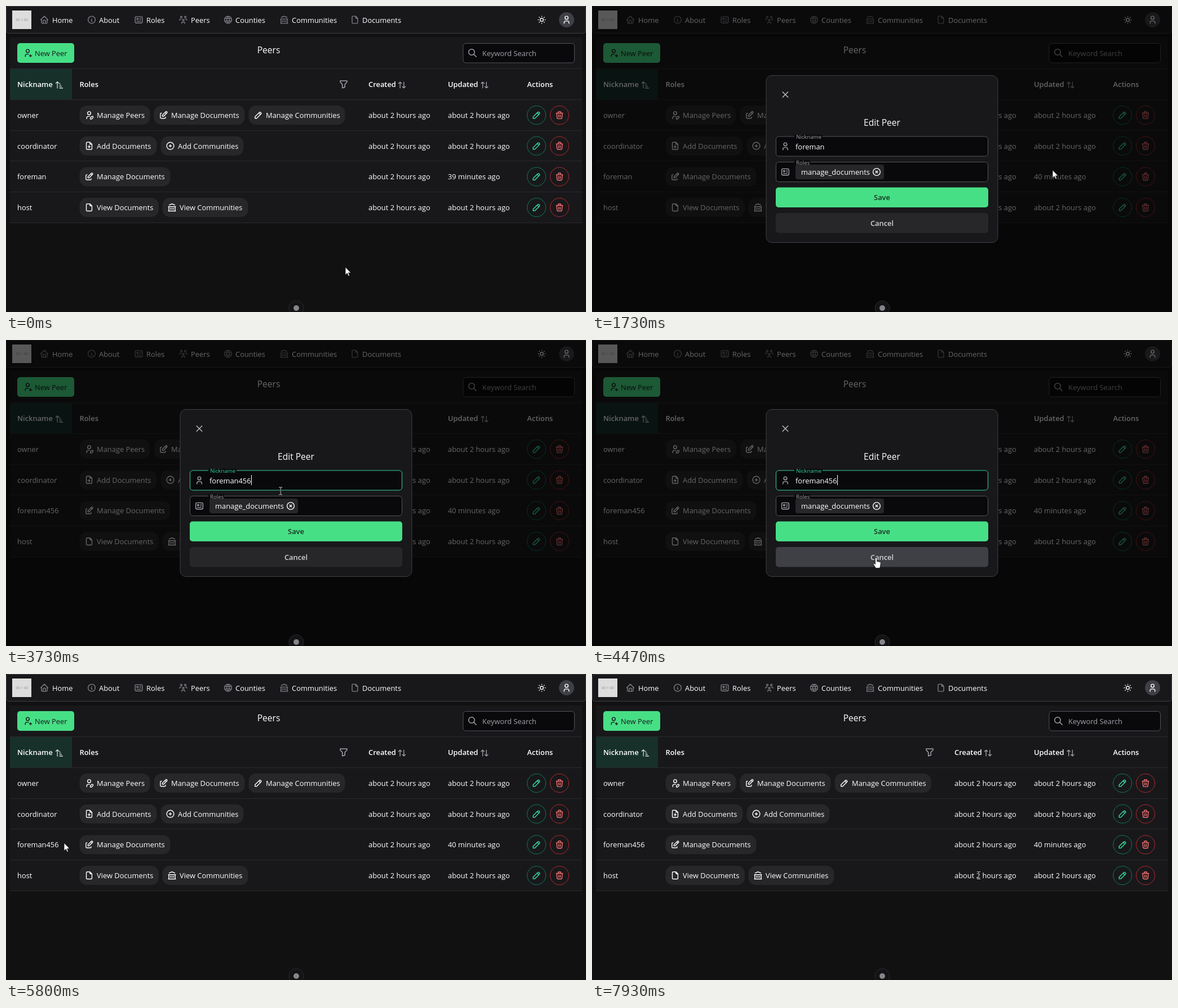
Animation, 1029 px wide and 544 px high, one loop 8 s. Source, as an HTML page:

```html
<!DOCTYPE html>
<html lang="en">
<head>
<meta charset="utf-8">
<title>Accounts table</title>
<style>
html, body { margin: 0; width: 100%; height: 100%; overflow: hidden; background: #111112; }
svg { display: block; width: 1029px; height: 544px; }
text { font: 12.9px "Open Sans", "Noto Sans", sans-serif; fill: #fff; white-space: pre; }
.bold { font-weight: 600; }
.title { font-size: 15.6px; }
.mid { text-anchor: middle; }
.label { font-size: 9.7px; fill: #a1a1aa; }
.icon { fill: none; stroke-width: 2; stroke-linecap: round; stroke-linejoin: round; }
.field { fill: #09090b; stroke: #52525b; }

/* 1% of the loop is 80 ms */
.anim { animation: 8s step-end infinite; }
.smooth { animation-timing-function: linear; }

.pointer { animation-name: path; }
@keyframes path {
  0%, .8% { transform: translate(602px, 464px); }
  3% { transform: translate(680px, 434px); }
  6% { transform: translate(868px, 343px); }
  8.5% { transform: translate(938px, 305px); }
  10%, 16.7% { transform: translate(946px, 300px); }
  18.8% { transform: translate(917px, 297px); }
  21.6% { transform: translate(821px, 292px); }
  23.5% { transform: translate(620px, 268px); }
  25%, 27.7% { transform: translate(525px, 252px); }
  30%, 42% { transform: translate(532px, 416px); }
  42.01%, 43.5% { transform: translate(498px, 252px); }
  46.6% { transform: translate(487px, 267px); }
  48% { transform: translate(492px, 318px); }
  50%, 50.8% { transform: translate(504px, 359px); }
  53.4%, 66% { transform: translate(504px, 387px); }
  69% { transform: translate(330px, 352px); }
  72.5% { transform: translate(103px, 300px); }
  74.5% { transform: translate(95px, 322px); }
  77% { transform: translate(62px, 332px); }
  80% { transform: translate(22px, 322px); }
  82% { transform: translate(8px, 300px); }
  83.4% { transform: translate(23px, 279px); }
  86% { transform: translate(58px, 268px); }
  88.5% { transform: translate(89px, 284px); }
  90.5% { transform: translate(78px, 318px); }
  92.5% { transform: translate(38px, 326px); }
  94.5% { transform: translate(10px, 322px); }
  96.5% { transform: translate(180px, 346px); }
  98.2% { transform: translate(540px, 362px); }
  99.1%, 100% { transform: translate(686px, 358px); }
}
.arrow { animation-name: arrow; }
@keyframes arrow {
  0%, 16.1%, 28.7%, 66.3% { visibility: visible; }
  8%, 24.5%, 37.5%, 98.6%, 100% { visibility: hidden; }
}
.hand { animation-name: hand; }
@keyframes hand {
  0%, 16.1%, 66.3%, 100% { visibility: hidden; }
  8%, 48.1% { visibility: visible; }
}
.beam { animation-name: beam; }
@keyframes beam {
  0%, 28.7%, 48.1% { visibility: hidden; }
  24.5%, 43.5%, 98.6%, 100% { visibility: visible; }
}

.dialog { transform-origin: 514.5px 272px; animation-name: dialog; }
@keyframes dialog {
  0%, 66%, 100% { opacity: 0; transform: scale(.7); }
  16.75% { opacity: 0; transform: scale(.7); animation-timing-function: cubic-bezier(0, 0, .2, 1); }
  18.625% { opacity: 1; transform: none; }
  64.125% { opacity: 1; transform: none; animation-timing-function: cubic-bezier(0, 0, .2, 1); }
}
.mask { animation-name: mask; }
@keyframes mask {
  0%, 66%, 100% { opacity: 0; }
  16.75% { opacity: 0; animation-timing-function: ease; }
  18.625% { opacity: .6; }
  64.125% { opacity: .6; animation-timing-function: ease; }
}

.tip { animation-name: tip; }
@keyframes tip { 0%, 17.4%, 100% { visibility: hidden; } 8.6% { visibility: visible; } }
.glow { animation-name: glow; }
@keyframes glow { 0%, 17.4%, 100% { visibility: hidden; } 8% { visibility: visible; } }
.before { animation-name: before; }
@keyframes before { 0% { visibility: visible; } 17.5%, 100% { visibility: hidden; } }
.after { animation-name: after; }
@keyframes after { 0% { visibility: hidden; } 17.5%, 100% { visibility: visible; } }

.key1 { animation-name: key1; }
.key2 { animation-name: key2; }
.key3 { animation-name: key3; }
@keyframes key1 { 0% { visibility: hidden; } 37.5%, 100% { visibility: visible; } }
@keyframes key2 { 0% { visibility: hidden; } 40%, 100% { visibility: visible; } }
@keyframes key3 { 0% { visibility: hidden; } 42.6%, 100% { visibility: visible; } }
.caret { animation-name: caret; }
@keyframes caret {
  0%, 34.1%, 100% { visibility: hidden; transform: none; }
  27.9% { visibility: visible; transform: none; }
  37.5% { visibility: visible; transform: translateX(7.4px); }
  40% { visibility: visible; transform: translateX(14.8px); }
  42.6%, 55.8% { visibility: visible; transform: translateX(22px); }
  49.2%, 62.5% { visibility: hidden; transform: translateX(22px); }
}
.ring { animation-name: ring; }
@keyframes ring { 0%, 62.5%, 100% { stroke: #52525b; } 27.9% { stroke: #34d399; } }
.tint { animation-name: tint; }
@keyframes tint { 0%, 62.5%, 100% { fill: #a1a1aa; } 27.9% { fill: #34d399; } }
.save { animation-name: save; }
@keyframes save { 0%, 51.6%, 100% { fill: #47df86; } 48.1% { fill: #86efac; } }
.cancel { animation-name: cancel; }
@keyframes cancel { 0%, 62.5%, 100% { fill: #27272a; } 51.6% { fill: #3f3f46; } }
</style>
</head>
<body>
<svg id="stage" viewBox="0 0 1029 544"></svg>
<script>
const ring = 'M3 12a9 9 0 1 0 18 0a9 9 0 1 0-18 0';
const head = 'M8 7a4 4 0 1 0 8 0a4 4 0 0 0-8 0';
const sheet = 'M14 3v4a1 1 0 0 0 1 1h4M17 21H7a2 2 0 0 1-2-2V5a2 2 0 0 1 2-2h7l5 5v11a2 2 0 0 1-2 2z';
const paths = {
  home: 'M5 12H3l9-9 9 9h-2M5 12v7a2 2 0 0 0 2 2h10a2 2 0 0 0 2-2v-7M9 21v-6a2 2 0 0 1 2-2h2a2 2 0 0 1 2 2v6',
  info: ring + 'M12 8.5h.01M11 12h1v4h1',
  card: 'M3 7a3 3 0 0 1 3-3h12a3 3 0 0 1 3 3v10a3 3 0 0 1-3 3H6a3 3 0 0 1-3-3zM7 10a2 2 0 1 0 4 0a2 2 0 1 0-4 0M15 8h2M15 12h2M7 16h10',
  group: 'M10 13a2 2 0 1 0 4 0a2 2 0 0 0-4 0M8 21v-1a2 2 0 0 1 2-2h4a2 2 0 0 1 2 2v1M15 5a2 2 0 1 0 4 0a2 2 0 0 0-4 0M17 10h2a2 2 0 0 1 2 2v1M5 5a2 2 0 1 0 4 0a2 2 0 0 0-4 0M3 13v-1a2 2 0 0 1 2-2h2',
  globe: ring + 'M3.6 9h16.8M3.6 15h16.8M11.5 3a17 17 0 0 0 0 18M12.5 3a17 17 0 0 1 0 18',
  bank: 'M3 21h18M3 10h18M5 6l7-3 7 3M4 10v11M20 10v11M8 14v3M12 14v3M16 14v3',
  file: sheet,
  fileAdd: sheet + 'M12 11v6M9 14h6',
  add: ring + 'M9 12h6M12 9v6',
  pencil: 'M4 20h4L18.5 9.5a2.8 2.8 0 1 0-4-4L4 16v4M13.5 6.5l4 4',
  edit: 'M7 7H6a2 2 0 0 0-2 2v9a2 2 0 0 0 2 2h9a2 2 0 0 0 2-2v-1M20.4 6.6a2.1 2.1 0 0 0-3-3L9 12v3h3zM16 5l3 3',
  person: head + 'M6 21v-2a4 4 0 0 1 4-4h4a4 4 0 0 1 4 4v2',
  personEdit: head + 'M6 21v-2a4 4 0 0 1 4-4h3.5M18.4 15.6a2.1 2.1 0 0 1 3 3L18 22h-3v-3z',
  personAdd: head + 'M6 21v-2a4 4 0 0 1 4-4h4M16 19h6M19 16v6',
  trash: 'M4 7h16M10 11v6M14 11v6M5 7l1 12a2 2 0 0 0 2 2h8a2 2 0 0 0 2-2l1-12M9 7V4a1 1 0 0 1 1-1h4a1 1 0 0 1 1 1v3',
  sun: 'M8 12a4 4 0 1 0 8 0a4 4 0 1 0-8 0M3 12h1M12 3v1M20 12h1M12 20v1M5.6 5.6l.7.7M18.4 5.6l-.7.7M17.7 17.7l.7.7M6.3 17.7l-.7.7',
  search: 'M3 10a7 7 0 1 0 14 0a7 7 0 1 0-14 0M21 21l-6-6',
  filter: 'M4 4h16v2.2a2 2 0 0 1-.6 1.4L15 12v7l-6 2v-8.5L4.5 7.6A2 2 0 0 1 4 6.2z',
  sort: 'M3 8l4-4 4 4M7 4v16M21 16l-4 4-4-4M17 20V4',
  sorted: 'M3 8l4-4 4 4M7 4v17M13 9h1M13 13h3M13 17h5M13 21h8',
  close: 'M18 6L6 18M6 6l12 12',
  remove: ring + 'M9.5 9.5l5 5M14.5 9.5l-5 5'
};

const icon = (name, x, y, color = '#fff', size = 17) =>
  `<path class="icon" d="${paths[name]}" stroke="${color}" transform="translate(${x - size / 2} ${y - size / 2}) scale(${size / 24})"/>`;
const text = (str, x, y, cls = '', style = '') =>
  `<text x="${x}" y="${y}" class="${cls}" style="${style}">${str}</text>`;
const box = (x, y, w, h, r, attrs) =>
  `<rect x="${x}" y="${y}" width="${w}" height="${h}" rx="${r}" ${attrs}/>`;
const disc = (x, y, r, attrs) => `<circle cx="${x}" cy="${y}" r="${r}" ${attrs}/>`;

const account = 'foreman' + [4, 5, 6]
  .map((digit, i) => `<tspan class="anim key${i + 1}">${digit}</tspan>`).join('');
const ago = 'about 2 hours ago';
const gray = '#a1a1aa', green = '#47df86';

function navbar() {
  const links = [
    ['Home', 'home', 68, 82], ['About', 'info', 152, 165], ['Roles', 'card', 235.5, 249],
    ['Peers', 'group', 314.5, 328], ['Counties', 'globe', 394, 407],
    ['Communities', 'bank', 493.5, 507], ['Documents', 'file', 619, 632]
  ];
  return box(.5, .5, 1028, 48, 5, 'fill="#18181b" stroke="#3f3f46"')
    + box(11, 8, 34, 33, 0, 'fill="#dddddd"')
    + text('40 × 40', 28, 27, 'mid', 'font-size:6.5px;fill:#999')
    + links.map(([name, pic, ix, x]) => icon(pic, ix, 24.5, '#7c7c84') + text(name, x, 29.5)).join('')
    + icon('sun', 950.5, 24.5)
    + disc(994.5, 24.5, 13.5, 'fill="#3f3f46"') + icon('person', 994.5, 24.5);
}

function table() {
  const heads = [['Nickname', 20], ['Roles', 130.5], ['Created', 643], ['Updated', 784], ['Actions', 924.5]];
  const rows = [
    ['owner', ago, [[130, 125, 'personEdit', 'Manage Peers'], [262, 161, 'edit', 'Manage Documents'], [430, 171, 'pencil', 'Manage Communities']]],
    ['coordinator', ago, [[130, 137, 'fileAdd', 'Add Documents'], [274, 147, 'add', 'Add Communities']]],
    [account, '', [[130, 161, 'edit', 'Manage Documents']]],
    ['host', ago, [[130, 140.5, 'file', 'View Documents'], [277, 152, 'bank', 'View Communities']]]
  ];
  let out = box(7, 56, 1015, 329.5, 0, 'fill="#18181b"')
    + box(20, 66, 101, 35, 5, `fill="${green}"`)
    + icon('personAdd', 38.5, 83.5, '#18181b') + text('New Peer', 51, 88.5, '', 'fill:#18181b')
    + text('Peers', 466, 84, 'title mid')
    + box(811, 66.5, 197.5, 34.5, 5, 'class="field"')
    + icon('search', 827.5, 83.5, gray, 18) + text('Keyword Search', 845, 88.5, '', 'fill:' + gray)
    + box(7, 111.5, 110, 55, 0, 'fill="#17302a"')
    + heads.map(([name, x]) => text(name, x, 144, 'bold')).join('')
    + icon('sorted', 94.5, 140, '#d4d4d8', 16) + icon('filter', 599, 139, gray, 18)
    + icon('sort', 702.5, 140.5, gray, 16) + icon('sort', 849, 140.5, gray, 16);
  for (let i = 0; i < 6; i++)
    out += box(7, Math.round(111 + i * 54.8), 1015, 1, 0, 'fill="#2a2a2d"');
  rows.forEach(([name, updated, chips], i) => {
    const y = 194 + i * 54.7, base = y + 4.8;
    out += text(name, 20, base) + text(ago, 643, base) + text(updated, 784, base);
    for (const [x, w, pic, label] of chips)
      out += box(x + .5, y - 17, w, 34, 13, 'fill="#27272a"') + icon(pic, x + 17.5, y) + text(label, x + 31, base);
    if (i === 2) {
      out += text('39 minutes ago', 784, base, 'anim before') + text('40 minutes ago', 784, base, 'anim after')
        + disc(941.2, y, 16.5, 'fill="#1a2a26" class="anim glow"');
    }
    out += disc(941.2, y, 16.5, 'fill="none" stroke="#0f7a57"') + icon('pencil', 941.2, y, '#34d399', 18)
      + disc(982, y, 16.5, 'fill="none" stroke="#b02a2a"') + icon('trash', 982, y, '#f87171');
  });
  return out + '<g class="anim tip"><path d="M937 323.5l4-4 4 4z" fill="#3f3f46"/>'
    + box(919.5, 323, 43, 34, 5, 'fill="#3f3f46"') + text('Edit', 941, 345, 'mid') + '</g>';
}

function dialog() {
  const field = (y, label, w, pic, ringCls, labelCls) =>
    box(326.5, y, 376, 35, 5, `class="field ${ringCls}"`)
    + box(359, y - 3, w, 6, 0, 'fill="#09090b"')
    + text(label, 362, y + 4, 'label ' + labelCls) + icon(pic, 343, y + 17.5, gray);
  return '<g class="anim smooth dialog">'
    + box(309, 123.5, 411, 297, 10, 'fill="#18181b" stroke="#3f3f46"')
    + icon('close', 343, 157.5, '#b4b4bb', 19)
    + text('Edit Peer', 514.5, 213, 'title mid')
    + field(232, 'Nickname', 50, 'person', 'anim ring', 'anim tint')
    + text(account, 361, 254.5)
    + box(413, 240, 1, 18, 0, 'fill="#fff" class="anim caret"')
    + field(277.5, 'Roles', 28, 'card', '', '')
    + box(361, 282, 157, 26, 4, 'fill="#27272a"')
    + text('manage_documents', 371, 300) + icon('remove', 505, 295)
    + box(326, 322.5, 377, 35.5, 5, `fill="${green}" class="anim save"`)
    + text('Save', 514.5, 345, 'mid bold', 'fill:#18301f')
    + box(326, 368, 377, 35.5, 5, 'fill="#27272a" class="anim cancel"')
    + text('Cancel', 514.5, 390.5, 'mid bold', 'fill:#d4d4d8') + '</g>';
}

const badge = disc(515, 537, 13, 'fill="#131315" stroke="#2b2b2f"') + disc(515, 537, 5, 'fill="#85858a"');

const beam = 'M-3-6.5h2.2l.8.7.8-.7H3M0-6V6M-3 6.5h2.2l.8-.7.8.7H3';
const pointer = `<g class="anim smooth pointer">
  <path class="anim arrow" d="M0 0V14.2l3.3-3 2.2 5 2.2-1-2.2-4.8H10z" fill="#fff" stroke="#000" stroke-width=".8"/>
  <path class="anim hand" d="M-1.5 1a1.5 1.5 0 0 1 3 0v5.5l5 1c1.2.3 1.8 1 1.8 2.2l-.8 5.3-1 3.5H-.5l-4-6.5c-.8-1.4.8-2.4 1.8-1.4l1.2 1.3z" fill="#fff" stroke="#000" stroke-width=".7"/>
  <g class="anim beam" fill="none"><path d="${beam}" stroke="#000" stroke-width="2.6"/><path d="${beam}" stroke="#e4e4e4"/></g>
</g>`;

document.getElementById('stage').innerHTML = navbar() + table()
  + box(0, 0, 1029, 544, 0, 'class="anim smooth mask"') + dialog() + badge + pointer;
</script>
</body>
</html>
```
